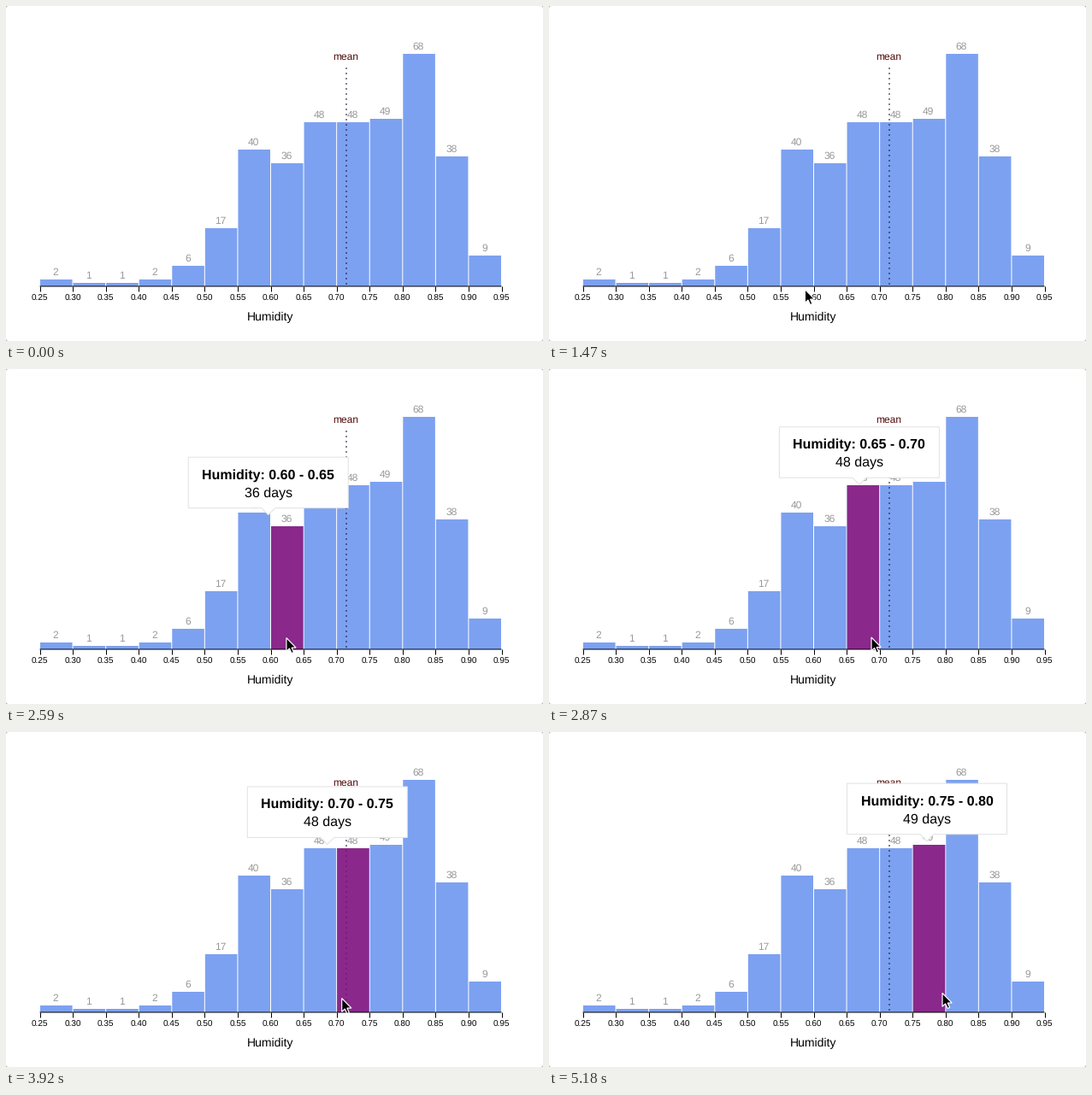
Write a matplotlib script that moves like this. It is 628x392 px and loops after 5250 ms.

```python
import numpy as np
import matplotlib.pyplot as plt
from matplotlib.animation import FuncAnimation
from matplotlib.patches import FancyBboxPatch, Polygon, Rectangle

W, H, DPI = 628, 392, 100
FRAMES, INTERVAL = 75, 70

COUNTS = [2, 1, 1, 2, 6, 17, 40, 36, 48, 48, 49, 68, 38, 9]
LEFT, STEP, BASE, UNIT = 39.5, 540 / 14, 328, 4
MID = 18.5  # bin edge to label centre
BLUE = "#7ca1f1"

TIP_W, TIP_H, TIP_RISE = 187, 59.5, 72
TIP_TIME = 300 / INTERVAL  # tooltip transition, in frames

# Pointer glides: start frame, length, destination
POINTER_START = (311, 396)
GLIDES = [
    (6, 6, (309, 379)),
    (17, 6, (296, 315)),
    (34, 7, (377, 314)),
    (53.1, 5.5, (406, 309.5)),
    (68.8, 5, (460, 305.5)),
]
ARROW = np.array([(0, 0), (0, 15.8), (3.6, 12.4), (6.1, 18), (8.6, 16.9),
                  (6.2, 11.5), (11.2, 11.5)])

plt.rcParams["font.family"] = "Liberation Sans"
plt.rcParams["text.hinting"] = "none"
plt.rcParams["lines.scale_dashes"] = False


def pt(px):
    return px * 72 / DPI


def smooth(t):
    t = np.clip(t, 0, 1)
    return t * t * (3 - 2 * t)


def css_ease(t):
    """Cubic bezier (.25, .1, .25, 1)."""
    s = np.linspace(0, 1, 101)
    x = 0.75 * s * (1 - s) ** 2 + 0.75 * s ** 2 * (1 - s) + s ** 3
    y = 0.3 * s * (1 - s) ** 2 + 3 * s ** 2 * (1 - s) + s ** 3
    return np.interp(t, x, y)


def edge(i):
    return LEFT + STEP * i


def bar_top(i):
    return BASE - UNIT * COUNTS[i]


def bar_rect(i):
    return edge(i) + 0.5, bar_top(i), STEP - 1, UNIT * COUNTS[i]


def pointer_at(frame):
    pos = np.array(POINTER_START, float)
    for start, length, goal in GLIDES:
        pos += (goal - pos) * smooth((frame - start) / length)
    return pos


def find_hovers():
    """Times at which the pointer enters a new bar, with the bar's index."""
    hovers = []
    for time in np.arange(0, FRAMES, 0.05):
        x, y = pointer_at(time)
        i = int((x - LEFT) // STEP)
        if bar_top(i) < y < BASE and (not hovers or hovers[-1][1] != i):
            hovers.append((time, i))
    return hovers


HOVERS = find_hovers()


def tip_home(i):
    """Centre x and top y of the tooltip resting over a bar."""
    return np.array([edge(i) + MID, bar_top(i) - TIP_RISE])


def tip_at(frame):
    pos = tip_home(HOVERS[0][1])
    ends = [start for start, _ in HOVERS[2:]] + [FRAMES]
    for (start, i), end in zip(HOVERS[1:], ends):
        t = (min(frame, end) - start) / TIP_TIME
        pos = pos + (tip_home(i) - pos) * css_ease(t)
    return pos


def tip_outline(cx, top):
    half, low = TIP_W / 2, top + TIP_H
    return [(cx - half, top), (cx + half, top), (cx + half, low), (cx + 8, low),
            (cx, low + 8), (cx - 8, low), (cx - half, low)]


fig = plt.figure(figsize=(W / DPI, H / DPI), dpi=DPI, facecolor="#b4b4b4")
ax = fig.add_axes([0, 0, 1, 1])
ax.set_xlim(0, W)
ax.set_ylim(H, 0)
ax.axis("off")


def label(x, y, text, size, color="black", **kw):
    return ax.text(x, y, text, fontsize=pt(size), color=color,
                   ha="center", va="baseline", **kw)


def line(xs, ys, **kw):
    ax.plot(xs, ys, solid_capstyle="butt", dash_capstyle="butt", **kw)


# Chart
ax.add_patch(FancyBboxPatch((0, 0), W, H, fc="white", ec="none", zorder=0,
                            boxstyle="round,pad=0,rounding_size=3"))
for i, count in enumerate(COUNTS):
    x, y, w, h = bar_rect(i)
    ax.add_patch(Rectangle((x, y), w, h, fc=BLUE, ec="none", snap=False,
                           zorder=1))
    label(edge(i) + MID, y - 5, str(count), 12, "#999999", zorder=2)

line([397.5, 397.5], [72, BASE], color="#1c1430", alpha=0.7, lw=pt(1.5),
     ls=(0, (pt(2), pt(4))), zorder=3)
label(397.5, 63, "mean", 12, "#520808", zorder=3)

line([LEFT, edge(14)], [BASE, BASE], color="black", lw=pt(1), snap=False,
     zorder=5)
for i in range(15):
    line([edge(i)] * 2, [BASE, BASE + 6], color="black", lw=pt(1), zorder=5)
    label(edge(i), 345, f"{0.25 + 0.05 * i:.2f}", 10, zorder=5)
label(309, 368, "Humidity", 14, zorder=5)

# Moving parts
glow = ax.add_patch(Rectangle((0, 0), 1, 1, fc="#8e0a72", alpha=0.8, ec="none",
                              snap=False, zorder=4))
tip = ax.add_patch(Polygon(tip_outline(0, 0), fc="white", ec="#e2e2e2",
                           lw=pt(1), zorder=6))
title = label(0, 0, "", 16, weight="bold", zorder=7)
days = label(0, 0, "", 16, zorder=7)
pointer = ax.add_patch(Polygon(ARROW, fc="black", ec="white", lw=pt(1.2),
                               joinstyle="miter", zorder=8))


def draw(frame):
    pointer.set_xy(ARROW + pointer_at(frame))

    hovered = [i for start, i in HOVERS if frame >= start]
    for part in (glow, tip, title, days):
        part.set_visible(bool(hovered))
    if hovered:
        i = hovered[-1]
        glow.set_bounds(*bar_rect(i))
        cx, top = tip_at(frame)
        tip.set_xy(tip_outline(cx, top))
        low = 0.25 + 0.05 * i
        title.set_text(f"Humidity: {low:.2f} - {low + 0.05:.2f}")
        title.set_position((cx, top + 25))
        days.set_text(f"{COUNTS[i]} days")
        days.set_position((cx, top + 46))
        fade = css_ease((frame - HOVERS[0][0]) / TIP_TIME)
        for part in (tip, title, days):
            part.set_alpha(fade)
    return glow, tip, title, days, pointer


anim = FuncAnimation(fig, draw, frames=FRAMES, interval=INTERVAL,
                     repeat=True, repeat_delay=0)
plt.show()
```
